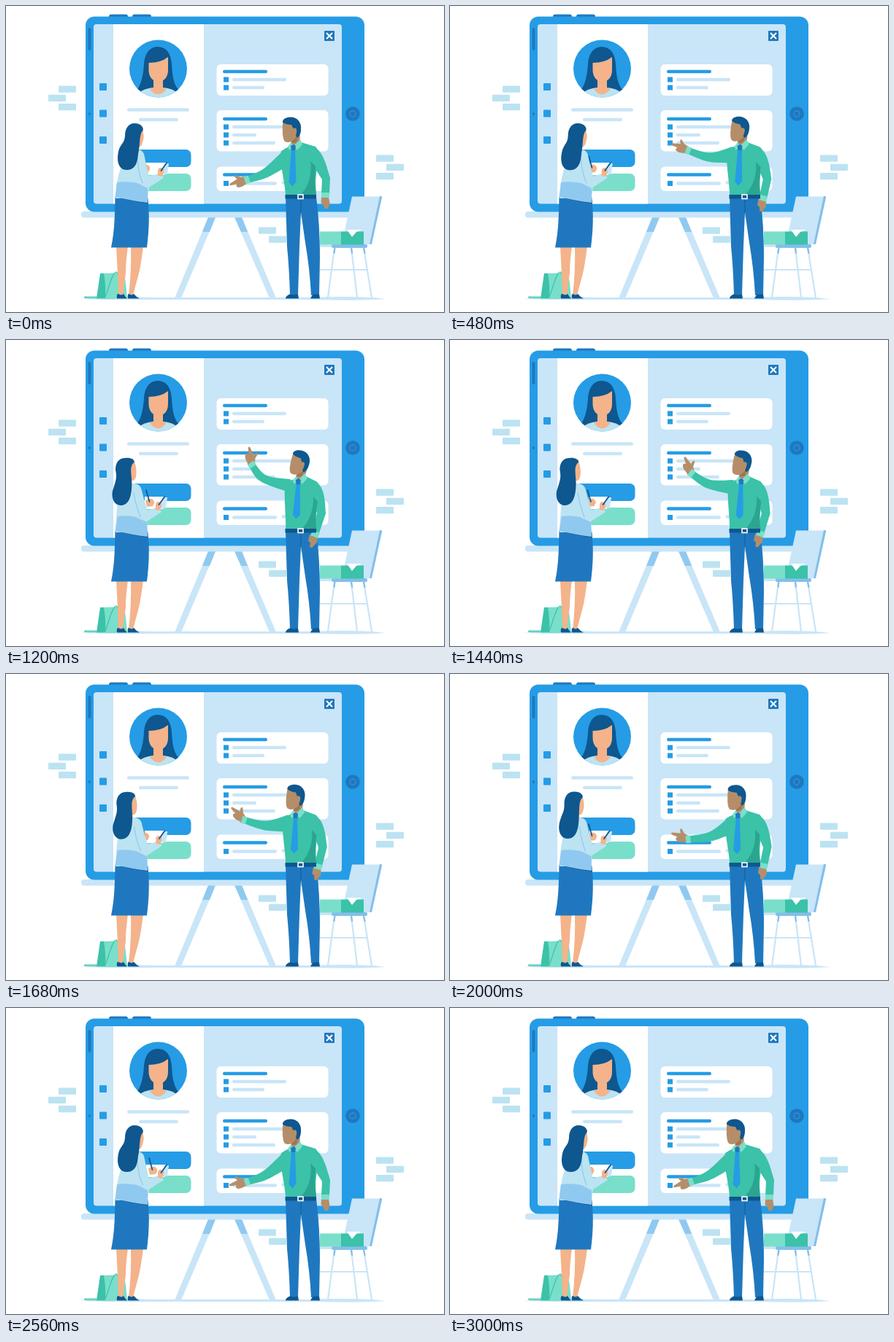
An HTML page for the animation above (3040 ms loop, 600 by 420 pixels).

```html
<!DOCTYPE html>
<html lang="en">
<head>
<meta charset="utf-8">
<title>Profile presentation</title>
<style>
html, body { margin: 0; width: 100%; height: 100%; overflow: hidden; background: #fff; }
svg { display: block; }
.blue { fill: #259ce5; }
.pale { fill: #c9e5f8; }
.mid { fill: #1f78bf; }
.navy { fill: #0e578f; }
.sky { fill: #bce3f2; }
.haze { fill: #90c9f0; }
.green { fill: #3bc2a8; }
.moss { fill: #2ba58f; }
.mint { fill: #79dfca; }
.peach { fill: #f4b38a; }
.tan { fill: #b58e69; }
.white { fill: #fff; }
.line { fill: none; stroke-linecap: round; }
</style>
</head>
<body>
<svg width="600" height="420" viewBox="0 0 600 420">
  <defs><clipPath id="disc"><circle cx="208.500" cy="86" r="39.500"/></clipPath></defs>

  <g id="bricks" class="sky"></g>

  <!-- easel and ground -->
  <path class="pale" d="M277 290H287L240 401H231ZM313 290H323L370 401H361Z"/>
  <path class="haze" d="M277 290H287L279 310H269ZM313 290H323L331 310H322Z"/>
  <path class="pale" d="M101 402Q145 398 200 400H420Q480 397 521 402Q480 405 420 403H200Q145 404 101 402Z"/>
  <rect class="pale" x="103" y="282" width="376" height="8.500" rx="4"/>

  <!-- tablet -->
  <rect class="mid" x="141" y="11.500" width="26" height="10" rx="3"/>
  <rect class="mid" x="173" y="11.500" width="26" height="10" rx="3"/>
  <rect class="blue" x="109" y="14.500" width="382" height="268" rx="12"/>
  <rect class="pale" x="120" y="25" width="340" height="246.500" rx="4"/>
  <path class="white" d="M147 25H271V271.500H147Z"/>
  <rect class="mid" x="112.500" y="30" width="4" height="31" rx="2"/>
  <circle class="mid" cx="114.500" cy="148" r="1.800"/>
  <circle class="mid" cx="475" cy="148" r="9.800"/>
  <circle cx="475" cy="148" r="4" fill="none" stroke="#2e93dc" stroke-width="1.300"/>
  <rect class="mid" x="436" y="34" width="14" height="14" rx="1"/>
  <path d="M439 37L447 45M447 37L439 45" stroke="#fff" stroke-width="2"/>
  <g id="ui"></g>

  <!-- avatar -->
  <circle class="blue" cx="208.500" cy="86" r="39.500"/>
  <g clip-path="url(#disc)">
    <path class="navy" d="M208 56C196 56 190 66 189 80C188 96 185 108 179 116Q195 122 208 119Q222 122 237 116C229 107 228 95 227 80C226 64 219 56 208 56Z"/>
    <path class="sky" d="M180 120Q190 113 201 112H216Q228 113 236 120L230 130H186Z"/>
    <path class="peach" d="M202 98H215V112L220 114Q208 129 197 114L202 112Z"/>
    <path class="peach" d="M195.500 78Q212 78 222 70V88C222 98 216 104 209 104C201 104 195.500 97 195.500 88Z"/>
  </g>

  <!-- chair and box -->
  <path class="line" d="M450 332L441 400M473 332L481 400M490 332L501 400M429 332L424 400M430 362H494" stroke="#c9e5f8" stroke-width="2.200"/>
  <path class="line" d="M450.500 332L449.500 339M473 332L474 339M490 332L491.500 339M429 332L428 339" stroke="#83bfea" stroke-width="2.200"/>
  <path class="pale" d="M474 261.500H513L499 327H460Z"/>
  <path fill="#83bfea" d="M512 261H513.500Q515.500 261 515 263L501 327H498Z"/>
  <path class="pale" d="M430 327H448V331H430Z"/>
  <rect fill="#83bfea" x="446" y="327" width="49" height="5" rx="2"/>
  <path class="mint" d="M430 309.500H460V327.500H430Z"/>
  <path class="green" d="M459 309.500H490V327.500H459Z"/>
  <path class="white" d="M467 307H488L480 310L474 317Z"/>

  <!-- bag -->
  <path class="green" d="M129 367H156L150 401.500H124Z"/>
  <path class="mint" d="M134 367L162 366Q165 385 166 401.500H136Q137 384 134 367Z"/>
  <path class="line" d="M136 399C140 391 145 366 151 365Q156 370 156 378M108 400.500V399H124M108 400.500H124" stroke="#3bc2a8" stroke-width="1.200"/>

  <!-- woman -->
  <path class="peach" d="M151 330H167Q164 352 164 366L160 397H154Q153 365 151 330ZM171 330H188Q185 354 182 367L174 397H168Q172 365 171 330Z"/>
  <path class="navy" d="M152 401.500Q151 395 154 395Q158 398 161 395Q163 399 166 401.500ZM167 401.500Q166 395 168.500 395Q172 398 175 395Q178 399 183 401.500Z"/>
  <path class="mid" d="M149.500 262H194C197 286 196 308 193 331.500H144C149 308 149 286 149.500 262Z"/>
  <path class="navy" d="M149.500 262H194L194.500 271Q170 268 149.500 262Z"/>
  <g id="pad">
    <path class="white" d="M192 215H219L217 232H192Z"/>
    <path class="pale" d="M217 216H223L221 231H212Z"/>
  </g>
  <g id="scribe">
    <path class="peach" d="M-6 -1Q-3 -5 3 -4Q7 -1 6 2L4 6L-4 7Z"/>
    <path class="line" d="M-5 -16L-.5 0" stroke="#0e578f" stroke-width="1.700"/>
  </g>
  <g id="woman"></g>
  <g id="grip">
    <path class="peach" d="M208 227Q208 222 212 222L216 224Q217 229 213 234L208 233Z"/>
    <path class="line" d="M212.500 226L220 215.500" stroke="#0e578f" stroke-width="1.800"/>
  </g>
  <g id="hair"></g>

  <!-- man -->
  <path class="mid" d="M383 262H425Q430 300 430 345L429 397H418Q416 360 410 325L404 283L402 330L400 397H389Q388 360 385 330Z"/>
  <path class="line" d="M404 266V283" stroke="#0e578f" stroke-width=".8"/>
  <path class="navy" d="M383 401.500Q383 398 389 395.500Q394 397.500 400 395.500L401 401.500ZM417 401.500Q418 398 421 396L429 395.500L430 401.500Z"/>
  <g id="body"></g>
  <path class="navy" d="M382.500 259H425V264.500H382.500Z"/>
  <rect x="400" y="259" width="7" height="5.500" fill="#0e578f" stroke="#fff" stroke-width="1.600"/>
  <g id="head">
    <path class="tan" d="M379 161Q388 155 397 160L401 172Q404 178 402 185L404 188L396 196L390 190L391 186Q386 188 382 186Q378 182 379 161Z"/>
    <path fill="#9c7654" d="M391 186Q396 183 398 178L399 185Q396 189 390.500 188Z"/>
    <path class="navy" d="M379 160C378 155 385 152 391 152.500C400 153 405 161 404 169C404 175 402 179 399 181L397 178Q400 170 394 169L391 163Q384 163 379 160Z"/>
    <path class="tan" d="M392 170Q395 165 398 169Q399 175 394 177Z"/>
  </g>
  <g id="collar">
    <path class="mint" d="M390.500 187L394 192L388 198L386 193ZM403 183L406 190L399 198L394 192Z"/>
  </g>
  <g id="front"></g>
  <path id="sleeve" class="green"/>
  <g id="hand">
    <path class="tan" d="M1 -5L-6 -7L-11 -12Q-13 -12.500 -13 -10L-11 -6L-22 -4Q-25 -2.500 -22 -1L-14 0Q-17 3 -14 5Q-9 7 -4 5L1 5Z"/>
  </g>
  <path id="cuff" class="mint"/>
</svg>
<script>
const $ = id => document.getElementById(id);
const add = (id, tag, attrs) => {
  const el = document.createElementNS("http://www.w3.org/2000/svg", tag);
  for (const k in attrs) el.setAttribute(k, attrs[k]);
  return $(id).appendChild(el);
};
const box = (id, cls, x, y, width, height, rx = 0) =>
  add(id, "rect", { class: cls, x, y, width, height, rx });
const bar = (cls, x1, x2, y, h = 4.5) => box("ui", cls, x1, y - h / 2, x2 - x1, h, h / 2);

// Screen contents
for (const y of [106, 142.5, 179]) box("ui", "blue", 128, y, 10, 10, 1);
bar("pale", 166, 251, 142.5);
bar("pale", 182, 236, 156);
box("ui", "blue", 165, 197, 88.5, 24, 7);
box("ui", "mint", 165, 230, 88.5, 24, 7);
const cards = [
  [80, 43, [384, 354]],
  [143, 56.5, [396, 343, 369]],
  [220.5, 33.5, [371]]
];
for (const [top, height, rows] of cards) {
  box("ui", "white", 288.5, top, 153, height, 6);
  bar("blue", 297, 358, top + (top > 200 ? 11 : 10 + (top > 100 ? 2 : 0)));
  rows.forEach((end, i) => {
    const y = top + (top > 100 ? 23 : 21) + i * 11;
    box("ui", "blue", 298, y - 3.5, 7, 7);
    bar("pale", 310, end, y);
  });
}
bar("pale", 377.5, 420, 242.5);
for (const [x, y] of [[72, 109.5], [507, 204.5], [346, 303.5]])
  for (let i = 0; i < (x === 346 ? 2 : 3); i++)
    box("bricks", "sky", x + (i % 2) * (x === 72 ? -14 : 14), y + i * 12.2, 24, 9.3, 1);

// Shapes that blend between a resting and a raised pose
const morphs = [];
const morph = (id, cls, key, from, to) =>
  morphs.push({ el: add(id, "path", { class: cls }), key, from, to: to.match(/[\d.]+/g).map(Number) });
const blend = (from, to, k) => {
  let i = 0;
  return from.replace(/[\d.]+/g, n => (+n + (to[i++] - n) * k).toFixed(2));
};

morph("woman", "sky", "tilt",
  "M166 200Q184 192 189 203L193 222L196 234L212 229L216 236L196 249L194 264L150 264Q151 235 160 215Z",
  "M160 199Q180 193 185 203L190 222L194 234L209 229L213 236L193 249L194 264L150 264Q151 235 154 215Z");
morph("woman", "haze", "tilt",
  "M152 242Q166 240 180 243L194 250L194 270Q170 267 149.5 262Z",
  "M153 242Q166 240 178 243L193 250L194 270Q170 267 149.5 262Z");
morph("woman", "line", "tilt",
  "M180 210Q181 228 187 243", "M175 210Q178 228 184 243");
$("woman").lastChild.setAttribute("style", "stroke:#90c9f0;stroke-width:1.2");
morph("hair", "peach", "tilt",
  "M180 169L187 169C188 174 189 178 188.5 181C187 188 186 193 182 194L182 200L177 199Z",
  "M168 168L176 167C178 173 179 178 178.5 184C178 190 176 194 172 193L173 199L167 199Z");
morph("hair", "navy", "tilt",
  "M176 161C186 161 189 168 187.5 171C182 176 184 192 181 203C180 220 174 225 165 225C155 225 151 214 154 200C157 188 162 190 163 178C163 168 168 161 176 161Z",
  "M163 162C172 161 177 165 175.5 168C170 172 171 180 172 190C173 205 172 227 157 227C147 227 143 214 147 204C151 192 152 188 150 178C150 168 155 162 163 162Z");

morph("body", "tan", "swing",
  "M432 262L442 262L443.5 271L441 278L437 278.5L434 272L431.5 270Z",
  "M416 267L427 270L426 278L419 285L416 284.5L417 278L414 276Z");
morph("body", "green", "swing",
  "M420 193C434 196 440 222 444 236L443 258L432 258L433 238L418 215Z",
  "M420 193C437 197 437 222 438 238L429 265L419 261L426 238L420 215Z");
morph("body", "mint", "swing",
  "M432 256L443.5 256L442.5 263L432 263Z",
  "M420 261L430 265L427 272L417 268Z");
morph("body", "green", "lean",
  "M389 192L377 199C374 215 382 240 383 260L425 260C423 242 425 230 427 215Q429 197 424 193L404 187Z",
  "M396 191L383 194C380 215 384 240 383 260L425 260C424 242 426 230 427 215Q432 198 425 194L411 187Z");
morph("body", "moss", "lean",
  "M417 213C420 230 414 250 403 259L425 259L423 240L424 220Z",
  "M421 215C422 230 416 250 405 259L425 259L424 242L427 222Z");
morph("front", "blue", "lean",
  "M391 196L396 196L397.5 241L392.5 247.5L387.5 242Z",
  "M398 196L403 196L403 240L397.5 245.5L393 240Z");
morph("front", "mid", "lean",
  "M390 192L393.5 190L397 192L396 198L391 198Z",
  "M397 192L400.5 190L404 192L403 198L398 198Z");

// time, lean, swing, elbow x y, wrist x y, hand angle, head tilt, writing offset
const keys = [
  [0, 0, 0, 354, 231, 329, 239, -22, 0, 0],
  [480, .5, .6, 355, 209, 325, 198, 15, .1, 4],
  [960, 1, 1, 350, 189, 338, 166, 66, .8, 5],
  [1200, .97, 1, 350, 191, 336, 170, 76, 1, 6],
  [1680, .45, .7, 355, 209, 325, 200, 40, .9, -1],
  [2000, .12, .55, 358, 224, 325, 227, 15, .5, 4],
  [2560, 0, 0, 354, 231, 329, 239, -17, 0, 10],
  [2800, 0, 0, 354, 231, 329, 239, -22, 0, 5],
  [3040, 0, 0, 354, 231, 329, 239, -22, 0, 0]
];
const slope = (i, c) => (keys[i + 1][c] - keys[i][c]) / (keys[i + 1][0] - keys[i][0]);
// Harmonic tangents keep the curve from overshooting
const tangent = (i, c) => {
  if (!i || i === keys.length - 1) return 0;
  const a = slope(i - 1, c), b = slope(i, c);
  return a * b > 0 ? 2 * a * b / (a + b) : 0;
};
const sample = (t, c) => {
  let i = 0;
  while (t >= keys[i + 1][0]) i++;
  const [p, q] = [keys[i], keys[i + 1]], h = q[0] - p[0], u = (t - p[0]) / h, s = u * u * (3 - 2 * u);
  return p[c] + (q[c] - p[c]) * s
    + h * u * (1 - u) * ((1 - u) * tangent(i, c) - u * tangent(i + 1, c));
};

const move = (id, value) => $(id).setAttribute("transform", value);
const draw = (id, d) => $(id).setAttribute("d", d);

function frame(now) {
  const t = now % 3040;
  const [lean, swing, ex, ey, wx, wy, angle, tilt, pen] = keys[0].slice(1).map((_, c) => sample(t, c + 1));
  const pose = { lean, swing, tilt };
  for (const m of morphs) m.el.setAttribute("d", blend(m.from, m.to, pose[m.key]));

  move("head", `translate(${7 * lean}) rotate(${14 * lean} 397 188)`);
  move("collar", `translate(${7 * lean})`);
  move("pad", `translate(${-2 * tilt})`);
  move("grip", `translate(${-3 * tilt})`);
  move("scribe", `translate(${191 + pen} 222)`);

  // Unit vector from wrist to elbow, and its normal on the upper side
  const len = Math.hypot(ex - wx, ey - wy), ux = (ex - wx) / len, uy = (ey - wy) / len;
  const at = (x, y, along, side) => `${x + ux * along + uy * side} ${y + uy * along - ux * side}`;
  const upper = at(ex, ey, 0, 5.5), lower = at(ex, ey, 0, -6.5);
  const sx = 383 + 7 * lean, sy = 195 - 4 * lean;
  draw("sleeve", `M${sx} ${sy}C${upper} ${upper} ${at(wx, wy, 2, 4.5)}L${at(wx, wy, 2, -4.5)}`
    + `C${lower} ${lower} ${sx - 3} ${sy + 28 - 11 * lean}Z`);
  draw("cuff", `M${at(wx, wy, -2, 5)}L${at(wx, wy, 4.5, 5.2)}L${at(wx, wy, 4.5, -5.2)}L${at(wx, wy, -2, -5)}Z`);
  move("hand", `translate(${wx} ${wy}) rotate(${angle})`);
  requestAnimationFrame(frame);
}
frame(0);
</script>
</body>
</html>
```
